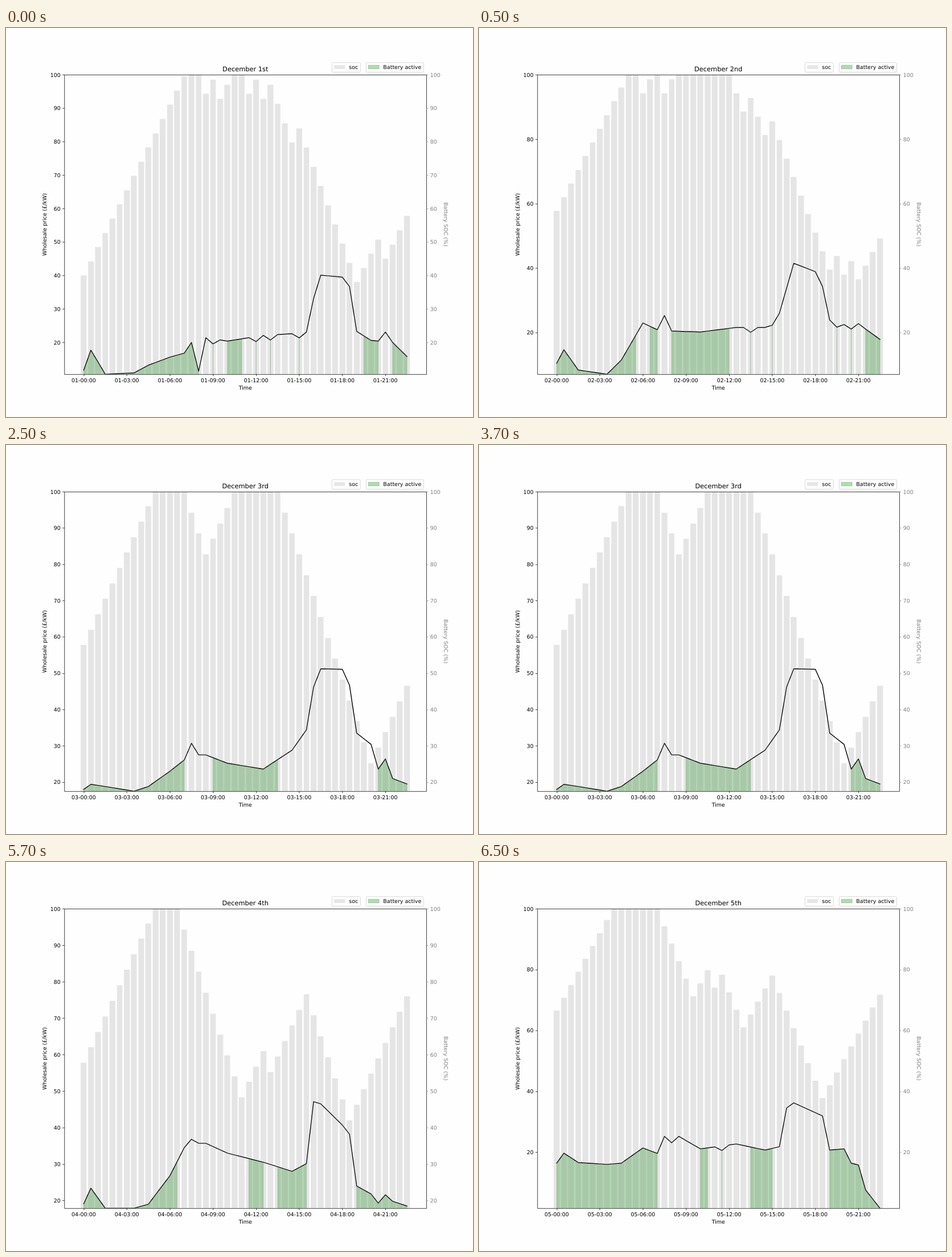
An HTML page that plays this animation: 820 px wide and 683 px high, repeating every 8 s.

```html
<!DOCTYPE html>
<html lang="en">
<head>
<meta charset="utf-8">
<title>Battery schedule</title>
<style>
  html, body { margin: 0; width: 100%; height: 100%; overflow: hidden; background: #fefefe; }
  svg { display: block; width: 100%; height: 100%; }
  text { font: 13.89px "DejaVu Sans", sans-serif; text-rendering: geometricPrecision; }
  .title { font-size: 16.67px; }
  .mid { text-anchor: middle; }
  .end { text-anchor: end; }
  .soft { fill: #808080; }
  .axis { fill: none; stroke: #000; stroke-width: 1.11; }
  .axis.soft { stroke: #808080; }
  .bar { fill: #808080; fill-opacity: .2; }
  .active { fill: #008000; fill-opacity: .3; stroke: #008000; stroke-opacity: .3; stroke-width: 1.1; }
  .price { fill: none; stroke: #000; stroke-width: 2.08; stroke-linejoin: round; stroke-linecap: square; }
  .box { fill: #fff; stroke: #ccc; stroke-opacity: .8; stroke-width: 1.39; }
</style>
</head>
<body>
<svg id="stage" viewBox="0 0 1200 1000" preserveAspectRatio="none"></svg>
<script>
const LEFT = 150, RIGHT = 1080, TOP = 120, BOTTOM = 890;
const MID_X = (LEFT + RIGHT) / 2, MID_Y = (TOP + BOTTOM) / 2;
const SLOTS = 46, BAR = 0.8;
const STEP = (RIGHT - LEFT) / 1.1 / (SLOTS - 1 + BAR);
const FIRST = LEFT + (RIGHT - LEFT) / 22 + STEP * BAR / 2;
const TICK = 4.86, PAD = 2 * TICK;
const CHARGE = 4.25, DRAIN = 5.75, DIP = 1.5;

// Half-hour slots at which each day's price trend is known
const KEYS = [0, 1, 3, 7, 9, 12, 14, 15, 16, 17, 20, 25, 29, 31, 32, 33, 36, 37, 38, 40, 41, 42, 43, 45];

const days = [
  { name: "1st", soc: 40, charge: "0-16 18 20-22 24 26 30 39-41 43-45",
    price: [11.7, 17.7, 10.5, 10.9, 13.2, 15.6, 16.8, 20, 11.4, 21.4, 20.4, 22.1,
      22.6, 23.1, 33.1, 40.1, 39.5, 36.7, 23.3, 20.6, 20.4, 23.1, 20, 15.8] },
  { name: "2nd", soc: 57.75, charge: "0-11 13-14 16-24 27 30 39 41 43-45",
    price: [10.5, 14.7, 8.4, 7.1, 11.5, 23, 20.9, 25.3, 20.5, 20.4, 20.2, 21.6,
      21.6, 26, 33.8, 41.5, 38.9, 34.3, 23.9, 22.5, 22.6, 22.8, 21.1, 17.9] },
  { name: "3rd", soc: 57.75, charge: "0-14 18-27 41-45",
    price: [18, 19.4, 18.8, 17.5, 18.8, 23, 26.1, 30.7, 27.5, 27.5, 25.2, 23.6,
      28.8, 34.4, 46.2, 51.2, 51.1, 46.7, 33.5, 30.4, 23.6, 26.4, 21, 19.5] },
  { name: "4th", soc: 57.75, charge: "0-13 23-25 27-31 38-45",
    price: [19.1, 23.4, 17.9, 17.9, 19, 26.8, 34.5, 36.8, 35.7, 35.7, 33, 30.5,
      28, 30.1, 47.1, 46.5, 40.7, 38.2, 24, 21.8, 19.3, 21.6, 19.8, 18.5] },
  { name: "5th", soc: 66.5, charge: "0-14 20-21 23 27-30 38-45",
    price: [16.4, 19.7, 16.6, 16, 16.4, 21.4, 19.6, 25.2, 23.1, 25.2, 21.1, 22.7,
      20.7, 21.8, 34.5, 36.2, 33, 31.9, 20.7, 21.1, 16.4, 15.8, 7.6, 1.6] }
];

const slots = [...Array(SLOTS).keys()];
const slotX = i => FIRST + i * STEP;
const crisp = v => Math.round(v) + 0.5;
const text = (x, y, str, cls = "", turn = 0) =>
  `<text class="${cls}" transform="translate(${x} ${y}) rotate(${turn})">${str}</text>`;
const rect = (x, y, w, h, cls, rx = 0) =>
  `<rect x="${x}" y="${y}" width="${w}" height="${h}" rx="${rx}" class="${cls}"/>`;
const path = (d, cls) => `<path d="${d}" class="${cls}"/>`;

function parseRuns(str) {
  return str.split(" ").map(part => {
    const [from, to = from] = part.split("-").map(Number);
    return [from, to];
  });
}

function trend(price, i) {
  const k = Math.max(1, KEYS.findIndex(key => key >= i));
  const part = (i - KEYS[k - 1]) / (KEYS[k] - KEYS[k - 1]);
  return price[k - 1] + part * (price[k] - price[k - 1]);
}

// A lone charging slot is a short dip below the trend
function priceAt(day, runs, i) {
  const lone = runs.some(([from, to]) => from === i && to === i);
  return trend(day.price, i) - (lone ? DIP : 0);
}

function drawBars(day, runs, valueY) {
  let soc = day.soc;
  return slots.map(i => {
    const charging = runs.some(([from, to]) => i >= from && i <= to);
    if (i) soc = Math.min(100, soc + (charging ? CHARGE : -DRAIN));
    const [x, end] = [-1, 1].map(side => Math.round(slotX(i) + side * STEP * BAR / 2));
    const y = Math.round(valueY(soc));
    return rect(x, y, end - x, BOTTOM - y, "bar");
  }).join("");
}

function drawAxes(day, number, min, valueY) {
  let out = rect(crisp(LEFT), crisp(TOP), RIGHT - LEFT, BOTTOM - TOP, "axis");
  for (let v = 20; v <= 100; v += min < 10 ? 20 : 10) {
    const y = valueY(v);
    out += path(`M${LEFT},${crisp(y)}h${-TICK}`, "axis") + path(`M${RIGHT},${crisp(y)}h${TICK}`, "axis soft");
    out += text(LEFT - PAD, y + 5.2, v, "end") + text(RIGHT + PAD, y + 5.2, v, "soft");
  }
  for (let hour = 0; hour < 24; hour += 3) {
    const x = slotX(hour * 2);
    out += path(`M${crisp(x)},${BOTTOM}v${TICK}`, "axis");
    out += text(x, 910.6, `0${number}-${String(hour).padStart(2, "0")}:00`, "mid");
  }
  return out + text(MID_X, 111.8, "December " + day.name, "mid title")
    + text(MID_X, 930.3, "Time", "mid")
    + text(104.5, MID_Y, "Wholesale price (£/kW)", "mid", -90)
    + text(1125.8, MID_Y, "Battery SOC (%)", "mid soft", 90);
}

const legendItem = (x, width, label, cls) => rect(x, 89, width, 24.5, "box", 2.8)
  + rect(x + 5.5, 95.6, 27.8, 9.7, cls) + text(x + 43.8, 105.4, label);
const legend = legendItem(837.7, 72.9, "soc", "bar") + legendItem(925.5, 147.8, "Battery active", "active");

function drawDay(day, index) {
  const min = Math.min(...day.price);
  const valueY = v => TOP + (100 - v) / (100 - min) * (BOTTOM - TOP);
  const runs = parseRuns(day.charge);
  const points = slots.map(i => `${slotX(i)},${valueY(priceAt(day, runs, i))}`);
  const fills = runs.map(([from, to]) => path(
    `M${slotX(from)},${BOTTOM}L${points.slice(from, to + 1).join("L")}L${slotX(to)},${BOTTOM}Z`, "active")).join("");
  return `<clipPath id="plot">${rect(LEFT, TOP, RIGHT - LEFT, BOTTOM - TOP, "")}</clipPath>`
    + `<g clip-path="url(#plot)">${fills}${path("M" + points.join("L"), "price")}${drawBars(day, runs, valueY)}</g>`
    + drawAxes(day, index + 1, min, valueY) + legend;
}

const stage = document.getElementById("stage");
const LOOP = 8000, HOLD = 2000, LEAD = 1500;
let shown = -1;

function render(ms) {
  const index = Math.floor((ms % LOOP + LEAD) / HOLD);
  if (index !== shown) {
    stage.innerHTML = drawDay(days[index], index);
    shown = index;
  }
}

const start = performance.now();
function tick() {
  render(performance.now() - start);
  requestAnimationFrame(tick);
}
tick();
</script>
</body>
</html>
```
